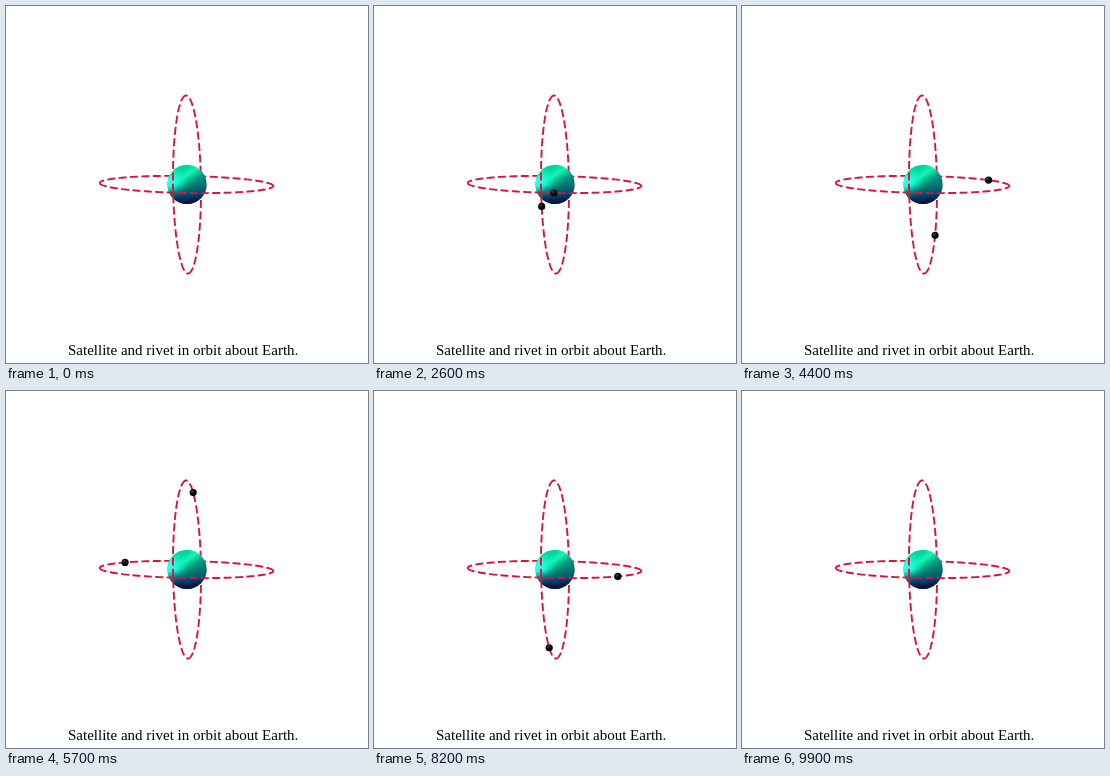
An HTML page that plays this animation: 362x357 px, repeating every 10 s.

```html
<!DOCTYPE html>
<html lang="en">
<head>
<meta charset="utf-8">
<title>Satellite and rivet in orbit</title>
<style>
  html, body { margin: 0; width: 100%; height: 100%; overflow: hidden; background: #fff; }
  svg { display: block; }
  text { font: 15px "Liberation Serif", "Times New Roman", serif; }
  .orbit { fill: none; stroke: #dc143c; stroke-width: 1.9; stroke-dasharray: 8 3.4; }
</style>
</head>
<body>
<svg width="362" height="357" viewBox="0 0 362 357">
  <defs>
    <linearGradient id="sea" gradientUnits="userSpaceOnUse" x1="169" y1="160" x2="193" y2="197">
      <stop offset="0" stop-color="#00c8a0"/>
      <stop offset=".15" stop-color="#00d69c"/>
      <stop offset=".32" stop-color="#14f5ae"/>
      <stop offset=".48" stop-color="#04a688"/>
      <stop offset=".62" stop-color="#00806e"/>
      <stop offset="1" stop-color="#006070"/>
    </linearGradient>
    <radialGradient id="glow" gradientUnits="userSpaceOnUse" cx="164" cy="175" r="17">
      <stop offset="0" stop-color="#3ffff0"/>
      <stop offset=".4" stop-color="#20ffe0" stop-opacity=".75"/>
      <stop offset="1" stop-color="#10f0c0" stop-opacity="0"/>
    </radialGradient>
    <linearGradient id="night" gradientUnits="userSpaceOnUse" x1="180" y1="178" x2="182" y2="198">
      <stop offset="0" stop-color="#005878" stop-opacity="0"/>
      <stop offset=".45" stop-color="#004a70" stop-opacity=".7"/>
      <stop offset=".75" stop-color="#002456"/>
      <stop offset="1" stop-color="#001038"/>
    </linearGradient>
    <radialGradient id="metal" cx=".36" cy=".36" r=".6">
      <stop offset="0" stop-color="#484848"/>
      <stop offset=".45" stop-color="#0a0a0a"/>
      <stop offset="1" stop-color="#000"/>
    </radialGradient>
  </defs>
  <g id="back"></g>
  <g>
    <circle cx="181" cy="178.4" r="19.7" fill="url(#sea)"/>
    <circle cx="181" cy="178.4" r="19.7" fill="url(#glow)"/>
    <circle cx="181" cy="178.4" r="19.7" fill="url(#night)"/>
  </g>
  <g id="front"></g>
  <text x="62" y="349">Satellite and rivet in orbit about Earth.</text>
</svg>
<script>
const STEPS = 99, STEP_MS = 100, LOOP_MS = 10000, TURNS = 2;
const back = document.getElementById("back");
const front = document.getElementById("front");
const { sin, cos, PI } = Math;
const rad = deg => deg * PI / 180;

// frontFrom: angle at which the half facing the viewer begins
const orbits = [
  {
    start: 80.5, frontFrom: 180,
    at: a => [180.5 + 86.8 * cos(a), 178.5 + 1.5 * cos(a) - 8.5 * sin(a)]
  },
  {
    start: 5.2, frontFrom: 90,
    at: a => [181 + 14 * cos(a) - sin(a), 178.5 - 89 * sin(a)]
  }
];

function add(parent, tag, attrs) {
  const el = document.createElementNS("http://www.w3.org/2000/svg", tag);
  for (const key in attrs) el.setAttribute(key, attrs[key]);
  return parent.appendChild(el);
}

function halfPath(orbit, from) {
  const points = [];
  for (let deg = 0; deg <= 180; deg += 2) {
    points.push(orbit.at(rad(from + deg)).map(v => v.toFixed(2)).join(" "));
  }
  return "M" + points.join("L");
}

for (const orbit of orbits) {
  add(back, "path", { class: "orbit", d: halfPath(orbit, orbit.frontFrom + 180) });
  add(front, "path", { class: "orbit", d: halfPath(orbit, orbit.frontFrom) });
}
for (const orbit of orbits) {
  orbit.ball = add(front, "circle", { r: 3.6, fill: "url(#metal)" });
}

function render(ms) {
  const step = Math.floor(ms % LOOP_MS / STEP_MS);
  const visible = step > 0 && step < STEPS;
  for (const orbit of orbits) {
    const deg = orbit.start + 360 * TURNS * step / STEPS;
    const [x, y] = orbit.at(rad(deg));
    const inFront = (deg - orbit.frontFrom + 720) % 360 < 180;
    const layer = inFront ? front : back;
    if (orbit.ball.parentNode !== layer) layer.appendChild(orbit.ball);
    orbit.ball.setAttribute("cx", x);
    orbit.ball.setAttribute("cy", y);
    orbit.ball.setAttribute("visibility", visible ? "visible" : "hidden");
  }
}

const began = performance.now();
function tick() {
  render(performance.now() - began);
  requestAnimationFrame(tick);
}
tick();
</script>
</body>
</html>
```
